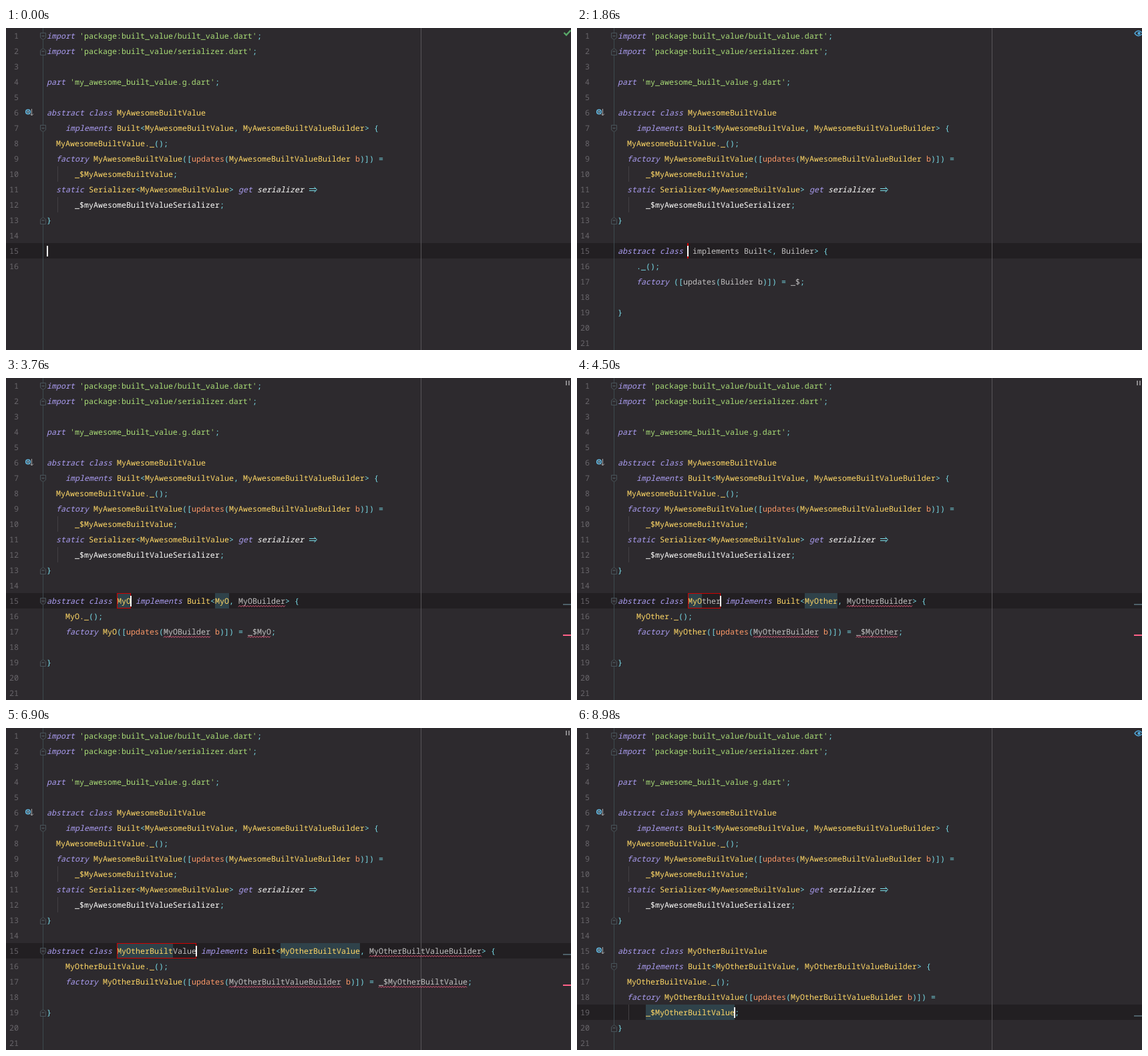
An HTML page for the animation above (9 s loop, 846 by 482 pixels).

```html
<!DOCTYPE html>
<html lang="en">
<head>
<meta charset="utf-8">
<title>Code template</title>
<style>
html, body { margin: 0; width: 100%; height: 100%; overflow: hidden; background: #2d2a2e; }
svg { display: block; width: 846px; height: 482px; }
text {
  font: 11.667px "Noto Sans Mono", "DejaVu Sans Mono", monospace;
  white-space: pre;
  text-rendering: geometricPrecision;
}
</style>
</head>
<body>
<svg id="stage" viewBox="0 0 846 482"></svg>
<script>
const LOOP = 9000, LEFT = 61, CHAR = 7, ROW = 23;
const EXPAND = 1400, PARSE = 2250, RESOLVE = 3280, CONFIRM = 7600, FORMAT = 8500;
const NAME = "MyOtherBuiltValue";
const KEYS = [2580, 2800, 3400, 3820, 3980, 4160, 4340, 4960, 5100, 5260, 5420,
  5600, 6260, 6400, 6540, 6700, 6860];
// [time, letters of the name already resolved]
const RESOLVED = [[RESOLVE, 2], [3650, 3], [4800, 7], [6100, 12], [7200, 17]];

const COLORS = {
  k: "#ab9df2", f: "#a9dc76", s: "#a9dc76", p: "#78dce8", y: "#ffd866",
  o: "#fc9867", g: "#c1c0c0", w: "#fcfcfa", i: "#fcfcfa"
};
const ITALIC = "kfi";
const SLATE = "#4d6068", RED = "#ff6188", MARK = "#2f424a";

const stage = document.getElementById("stage");
const colX = col => LEFT + col * CHAR;
const rowY = line => (line - 1) * ROW;
const escape = s => s.replace(/&/g, "&amp;").replace(/</g, "&lt;").replace(/>/g, "&gt;");
const rect = (x, y, w, h, fill) =>
  `<rect x="${x}" y="${y}" width="${w}" height="${h}" fill="${fill}"/>`;
const path = (d, stroke, width = 1) =>
  `<path d="${d}" fill="none" stroke="${stroke}" stroke-width="${width}"/>`;

function squiggle(x, y, width) {
  let d = `M${x} ${y + 2}`;
  for (let i = 2; i <= width; i += 2) d += `L${x + i} ${y + (i % 4 ? 0 : 2)}`;
  return path(d, RED, 0.9);
}

// Code is written as tag`text pairs; a capital tag adds an error underline.
function codeLine(line, code) {
  const parts = code.split("`"), y = rowY(line);
  let col = 0, spans = "", extra = "";
  for (let i = 0; i + 1 < parts.length; i += 2) {
    const tag = parts[i].toLowerCase(), text = parts[i + 1], x = colX(col);
    if (tag === "a") {
      extra += path(`M${x + 1} ${y + 10.5}h10M${x + 1} ${y + 13.5}h10M${x + 8.5} ${y + 8}l4 4l-4 4`, COLORS.p);
    } else {
      const style = ITALIC.includes(tag) ? ' font-style="italic"' : "";
      spans += `<tspan x="${x}" fill="${COLORS[tag]}"${style}>${escape(text)}</tspan>`;
      if (parts[i] !== tag) extra += squiggle(x, y + 18.5, text.length * CHAR);
    }
    col += text.length;
  }
  return `<text y="${y + 16}">${spans}</text>${extra}`;
}

const formatted = n => [
  "k`abstract class `y`" + n,
  "g`    `k`implements `y`Built`p`<`y`" + n + "`p`, `y`" + n + "Builder`p`> {",
  "g`  `y`" + n + "._`p`();",
  "g`  `k`factory `y`" + n + "`p`([`o`updates`p`(`y`" + n + "Builder `o`b`p`)]) =",
  "g`      `y`_$" + n + "`p`;"
];

const HEAD = [
  "k`import `s`'package:built_value/built_value.dart'`p`;",
  "k`import `s`'package:built_value/serializer.dart'`p`;",
  "",
  "k`part `s`'my_awesome_built_value.g.dart'`p`;",
  "",
  ...formatted("MyAwesomeBuiltValue"),
  "g`  `k`static `y`Serializer`p`<`y`MyAwesomeBuiltValue`p`> `k`get `i`serializer `a`=>",
  "g`      `w`_$myAwesomeBuiltValueSerializer`p`;",
  "p`}",
  ""
];

const rawTemplate = [
  "k`abstract class `g` implements Built`p`<, `g`Builder`p`> {",
  "g`    `p`._();",
  "g`    `k`factory `p`([`g`updates`p`(`g`Builder b`p`)]) = `g`_$`p`;",
  "",
  "p`}"
];

const brokenTemplate = n => [
  "k`abstract class `g`" + n + " `G`implements`g` `G`Built`p`<`g`" + n + "`P`,`g` " +
    "`G`" + n + "Builder`p`> `P`{",
  "g`    " + n + "`p`.`P`_`p`()`P`;",
  "g`    `f`factory `g`" + n + "`p`([`o`updates`p`(`g`" + n + "`y`Builder `o`b`p`)]) `P`=`g` " +
    "`G`_$`g`" + n + "`p`;",
  "",
  "P`}"
];

const resolvedTemplate = (n, known) => [
  "k`abstract class `y`" + n.slice(0, known) + "`g`" + n.slice(known) +
    "`k` implements `y`Built`p`<`y`" + n + "`p`, `G`" + n + "Builder`p`> {",
  "g`    `y`" + n + "._`p`();",
  "g`    `k`factory `y`" + n + "`p`([`o`updates`p`(`G`" + n + "Builder`o` b`p`)]) = `G`_$" + n + "`p`;",
  "",
  "p`}"
];

function fold(line, closes) {
  const y = rowY(line) + 12.5, s = closes ? -1 : 1;
  return `<path d="M51.5 ${y - 5 * s}h8v${7 * s}l-4 ${3 * s}l-4 ${-3 * s}z" fill="#2d2a2e" stroke="#48545a"/>` +
    path(`M53.5 ${y - 0.5}h4`, "#5c6a70");
}

function subclassIcon(line) {
  const y = rowY(line) + 10.5;
  return `<circle cx="33" cy="${y}" r="3.2" fill="#2d2a2e" stroke="#5fb0d6" stroke-width="1.8"/>` +
    `<circle cx="33" cy="${y}" r="1.3" fill="#8fc6e0"/>` +
    path(`M38.5 ${y - 4.5}v10M36 ${y + 3}l2.5 2.5l2.5 -2.5`, "#a5a8aa");
}

const STATUS = {
  ok: path("M835.5 7l3.5 3.5l6.5 -7", "#59a869", 2.4),
  eye: path("M835 8q5.5 -7.5 12 0q-6.5 7.5 -12 0z", "#4fa6d8", 1.3) +
    '<circle cx="841.5" cy="8" r="2.2" fill="#4fa6d8"/>',
  busy: rect(838, 4, 2, 7, "#8a888b") + rect(842, 4, 2, 7, "#8a888b")
};

const stripe = (line, color) => rect(834, rowY(line) + 16, 12, 2, color);
const count = (list, t) => list.filter(v => v <= t).length;

function stateAt(t) {
  const typed = count(KEYS, t);
  const step = count(RESOLVED.map(r => r[0]), t);
  const phase = count([EXPAND, PARSE, RESOLVE, CONFIRM, FORMAT], t);
  const status = t < 500 ? "ok" : phase === 3 ? "busy" : "eye";
  return { typed, phase, status, known: step ? RESOLVED[step - 1][1] : 0 };
}

function draw({ typed, phase, status, known }) {
  const name = NAME.slice(0, typed), size = typed;
  const body = [
    () => [],
    () => rawTemplate,
    () => brokenTemplate(name),
    () => resolvedTemplate(name, known),
    () => resolvedTemplate(name, known),
    () => [...formatted(name), "p`}"]
  ][phase]();

  let line = 15, col = 0, marks = "", stripes = "", folds = "", guides = [10, 12];
  const mark = (at, from, len) => {
    marks += rect(colX(from), rowY(at), len * CHAR, ROW, MARK);
  };

  if (phase > 0 && phase < 4) col = 15 + size;
  if (phase === 2) stripes = [15, 16, 17, 19].map(n => stripe(n, RED)).join("");
  if (phase === 3) {
    mark(15, 15, known);
    mark(15, 15 + size + 18, size);
    stripes = stripe(15, SLATE) + stripe(17, RED);
  }
  if (phase === 4) {
    line = 17;
    col = 4 + 8 + size + 10 + size + 7 + 8 + size;
    mark(17, col - size - 2, size + 2);
    stripes = stripe(17, RED);
  }
  if (phase === 3 || phase === 4) folds = fold(15) + fold(19, true);
  if (phase === 5) {
    line = 19;
    col = 6 + 2 + size;
    mark(19, 6, size + 2);
    stripes = stripe(19, SLATE);
    folds = fold(16) + fold(20, true) + subclassIcon(15);
    guides.push(19);
  }

  let out = rect(0, 0, 846, 482, "#2d2a2e") + rect(0, rowY(line), 846, ROW, "#221f22");
  out += marks + rect(55, 0, 1, 482, "#3d4a4f") + rect(621, 0, 1, 482, "#59565a");
  out += guides.map(n => rect(77, rowY(n), 1, ROW, "#434044")).join("");
  for (let n = 1; n <= (phase ? 21 : 16); n++) {
    out += `<text x="19" y="${rowY(n) + 16}" text-anchor="end" fill="#68656a">${n}</text>`;
  }
  out += fold(1) + fold(2, true) + fold(7) + fold(13, true) + subclassIcon(6) + folds;
  out += [...HEAD, ...body].map((code, i) => code ? codeLine(i + 1, code) : "").join("");

  const x = colX(col), y = rowY(line);
  if (phase > 0 && phase < 4) {
    out += `<rect x="166.5" y="${y + 0.5}" width="${Math.max(size * CHAR - 1, 0.01)}" height="22" fill="none" stroke="#d00000"/>`;
    if (!size) out += rect(165, y, 2, ROW, "#d00000");
  }
  out += rect(col ? x - 1 : x, y + 4, 2, 16, "#fcfcfa");
  stage.innerHTML = out + stripes + STATUS[status];
}

let shown = "";
function frame() {
  const state = stateAt(performance.now() % LOOP);
  const key = JSON.stringify(state);
  if (key !== shown) draw(state);
  shown = key;
  requestAnimationFrame(frame);
}
frame();
</script>
</body>
</html>
```
